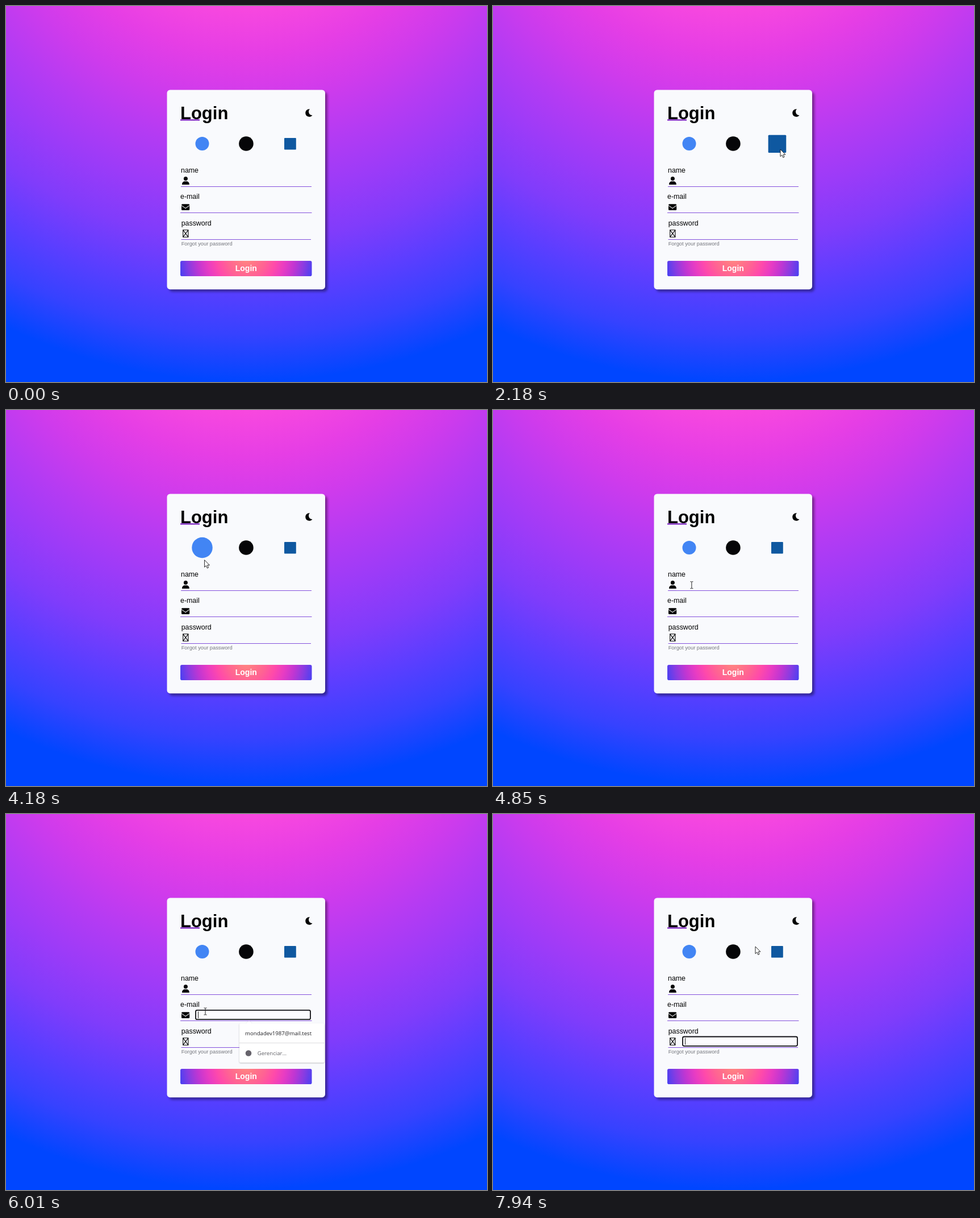
Write an HTML page that moves like this. It is 847x661 px and loops after 8000 ms.

```html
<!DOCTYPE html>
<html lang="en">
<head>
<meta charset="utf-8">
<title>Login</title>
<style>
  html, body { margin: 0; width: 100%; height: 100%; overflow: hidden; background: #0046ff; }
  svg { display: block; width: 100%; height: 100%; font-family: "Liberation Sans", Arial, sans-serif; }
  .card { fill: #f9fafd; filter: drop-shadow(4px 4px 2px rgba(0, 0, 0, .4)); }
  .label { font-size: 12.4px; }
  .line { stroke: #8450dc; }
  .field { fill: #fcfcfe; stroke: #101014; stroke-width: 1.8; }
  .panel { fill: #fff; filter: drop-shadow(0 1px 1px rgba(0, 0, 0, .25)); }
  .menu text { font: 9.65px "Open Sans", "Noto Sans", sans-serif; fill: #202024; white-space: pre; }
  .menu .hint { fill: #606066; }
</style>
</head>
<body>
<svg viewBox="0 0 847 661" preserveAspectRatio="none">
  <defs>
    <radialGradient id="sky" gradientUnits="userSpaceOnUse" cx="423.5" cy="-330" r="990" fr="330"/>
    <radialGradient id="glow" gradientUnits="userSpaceOnUse" cx="423" cy="442.5" r="120"/>
  </defs>

  <rect width="847" height="661" fill="url(#sky)"/>
  <rect class="card" x="283.5" y="147.5" width="278.5" height="350.7" rx="5.5"/>

  <text x="307" y="199" font-size="31" font-weight="700">Login</text>
  <rect x="307" y="199.3" width="34" height="2.2" fill="#7a1fc0"/>
  <path d="M535 181.3A6.8 6.8 0 1 0 539.5 192A6.2 6.2 0 0 1 535 181.3Z"/>

  <circle id="left" cx="345.5" cy="242" r="12" fill="#4285f4"/>
  <circle id="mid" cx="422.9" cy="242" r="12.8" fill="#060608"/>
  <rect id="right" x="490" y="232" width="20.8" height="20.6" rx="1" fill="#0f58a0"/>

  <text class="label" x="308" y="293">name</text>
  <circle cx="316.4" cy="303.4" r="3.5"/>
  <path d="M310 314C310 310.5 312 308.3 314.6 308.3H318.2C320.8 308.3 322.8 310.5 322.8 314Z"/>
  <path class="line" d="M308 317.5H538"/>

  <text class="label" x="307" y="339.3">e-mail</text>
  <rect x="309" y="348.3" width="14.2" height="10.8" rx="1.6"/>
  <path d="M309 350.6L316.1 355.6L323.2 350.6" fill="none" stroke="#f9fafd" stroke-width="1.1"/>
  <path class="line" d="M307 363.5H538.5"/>

  <text class="label" x="308.7" y="385.7">password</text>
  <path d="M311.7 393.8H320.9V406.2H311.7ZL320.9 406.2M320.9 393.8L311.7 406.2" fill="none" stroke="#000" stroke-width="1.1"/>
  <path class="line" d="M308.5 410.5H537"/>
  <text x="308.7" y="421.4" font-size="9.3" fill="#74767c">Forgot your password</text>

  <rect x="307" y="448" width="231.5" height="27" rx="2.8" fill="url(#glow)"/>
  <text x="422.8" y="465.8" font-size="14" font-weight="700" fill="#fff" text-anchor="middle">Login</text>

  <g id="field">
    <rect class="field" x="334" y="298.3" width="202" height="16.3" rx="2.5"/>
    <path id="caret" stroke="#222" d="M338.5 300.5V312.5"/>
  </g>

  <g id="names" class="menu">
    <path class="panel" d="M412 321.5H421.5L426 317L430.5 321.5H585Q587 321.5 587 323.5V493Q587 495 585 495H412Q410 495 410 493V323.5Q410 321.5 412 321.5Z"/>
  </g>
  <g id="mails" class="menu">
    <path class="panel" d="M413 368H423.5L428 363.5L432.5 368H558.5Q560.5 368 560.5 370V435Q560.5 437 558.5 437H413Q411 437 411 435V370Q411 368 413 368Z"/>
    <path d="M411 402.5H560.5" stroke="#dcdce0"/>
    <text x="421" y="389">mondadev1987@mail.test</text>
    <circle cx="427" cy="420.5" r="5.3" fill="#66636b"/>
    <text class="hint" x="442.7" y="424">Gerenciar...</text>
  </g>

  <path id="arrow" d="M0 0V12.6L2.9 9.9L4.8 14.4L7 13.4L5.1 9.1H8.9Z" fill="#fff" stroke="#111" stroke-width=".9"/>
  <path id="beam" d="M-2.5 -6H-.8L0 -5.3L.8 -6H2.5M0 -5.3V5.3M-2.5 6H-.8L0 5.3L.8 6H2.5" fill="none" stroke="#222"/>
</svg>
<script>
const LOOP = 8000, STEP = 70;
const $ = id => document.getElementById(id);
const show = (id, on) => $(id).setAttribute("visibility", on ? "inherit" : "hidden");
const move = (id, x, y) => $(id).setAttribute("transform", `translate(${x} ${y})`);

// Pointer strokes: each bends through a control point to its end
const entry = [764, 630];
const strokes = [
  { from: 660, to: 1430, bend: [195, 300], end: [458, 199] },
  { from: 1500, to: 2180, bend: [600, 141], end: [506, 252] },
  { from: 2440, to: 3060, bend: [450, 256], end: [429, 248] },
  { from: 3360, to: 3910, bend: [390, 254], end: [350, 254] },
  { from: 4180, to: 4980, bend: [347, 315], end: [351, 307] },
  { from: 5250, to: 6010, bend: [351, 355], end: [351, 347] },
  { from: 6340, to: 6610, bend: [352, 380], end: [363, 401] },
  { from: 6810, to: 7590, bend: [425, 500], end: [446, 426] },
  { from: 7660, to: 7940, bend: [490, 330], end: [462, 233] }
];
const hovers = [
  { id: "left", from: 3700, to: 4190 },
  { id: "mid", from: 2870, to: 3430 },
  { id: "right", from: 1960, to: 2500 }
];
const clicks = [4910, 5900, 6880];

function add(parent, tag, attrs, text = "") {
  const node = document.createElementNS("http://www.w3.org/2000/svg", tag);
  for (const key in attrs) node.setAttribute(key, attrs[key]);
  node.textContent = text;
  $(parent).append(node);
}

function fillGradient(id, colors) {
  colors.split(" ").forEach((color, i, all) =>
    add(id, "stop", { offset: i / (all.length - 1), "stop-color": color }));
}

fillGradient("sky", "#f848df #e63ee5 #cf3bec #b43bf3 #9b3bf8 #803cfb #5b3eff #3642ff #0046ff");
fillGradient("glow", "#ff8a80 #ff7588 #ff6294 #ff4aaa #e83cc3 #c136d2 #883ce2 #4740f2");

["Noel Gustavio Brandolina Terva", "Noel  Gustavio Brandolina Terva", "Front-end Especializar",
 "Noel Gustavi8O Brandolina Terva", "Noel Terva", "Noel Gustavio Brando"]
  .forEach((name, i) => add("names", "text", { x: 419, y: 342.6 + i * 27.9 }, name));

function ease(k) {
  k = Math.max(0, Math.min(1, k));
  return k * k * (3 - 2 * k);
}

// The screen refreshes in steps while the pointer moves and rests in between
function sample(time) {
  const i = strokes.findLastIndex(s => time >= s.from);
  if (i < 0) return { t: 0, x: entry[0], y: entry[1] };
  const { from, to, bend, end } = strokes[i];
  const start = i ? strokes[i - 1].end : entry;
  const count = Math.round((to - from) / STEP);
  const step = Math.min(count, Math.floor((time - from) / (to - from) * count + .1));
  const k = (step + 1) / (count + 1);
  const curve = a => (1 - k) ** 2 * start[a] + 2 * k * (1 - k) * bend[a] + k * k * end[a];
  return { t: from + step / count * (to - from), x: curve(0), y: curve(1) };
}

function draw(time) {
  const { t, x, y } = sample(time);

  hovers.forEach(({ id, from, to }, i) => {
    const cx = 345.5 + 77.4 * i;
    const s = 1 + .52 * (ease((t - from) / 190) - ease((t - to) / 190));
    $(id).setAttribute("transform", `translate(${cx} 242) scale(${s}) translate(${-cx} -242)`);
  });

  const row = clicks.findLastIndex(click => t >= click);
  show("field", row >= 0);
  show("caret", (t - clicks[row]) % 1000 < 500);
  move("field", 0, 46.6 * Math.max(row, 0));
  show("names", row === 0);
  show("mails", row === 1);

  const typing = t >= 4580 && t < 6980;
  show("arrow", t > 0 && !typing);
  show("beam", typing);
  move("arrow", x, y);
  move("beam", x, y);
}

const began = performance.now();
function tick() {
  draw((performance.now() - began) % LOOP);
  requestAnimationFrame(tick);
}
tick();
</script>
</body>
</html>
```
